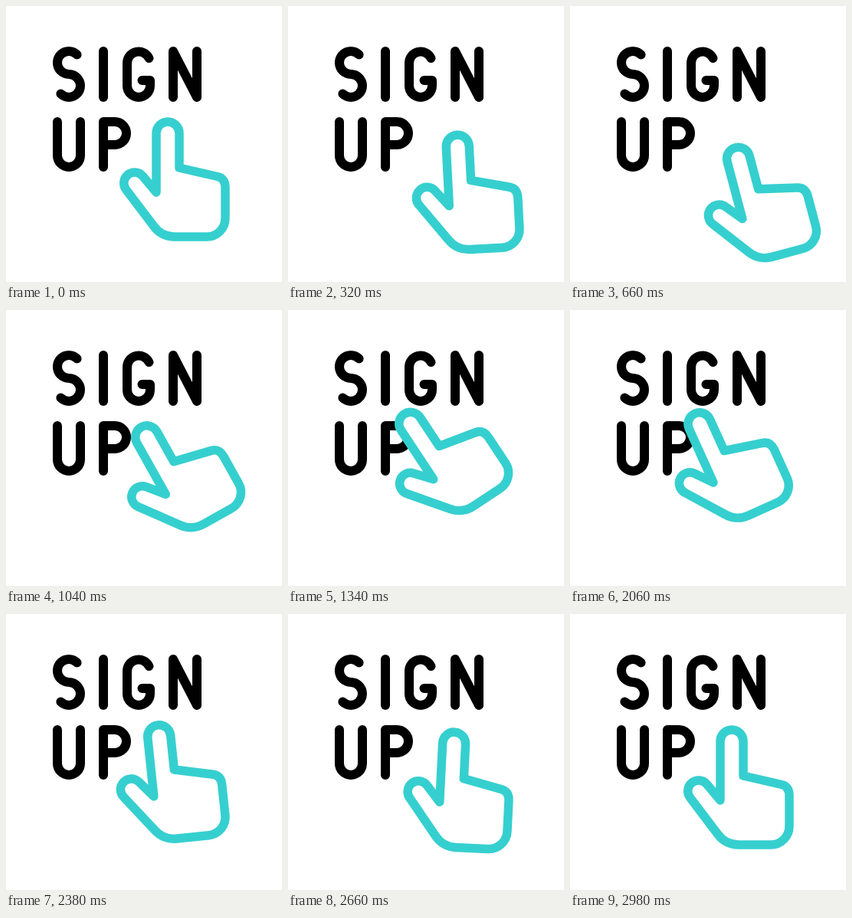
Recreate the animation shown at these times as an HTML page. Size 360x360 px, loop 3.6 s.

```html
<!DOCTYPE html>
<html lang="en">
<head>
<meta charset="utf-8">
<title>Sign up</title>
<style>
  html, body { margin: 0; width: 100%; height: 100%; overflow: hidden; background: #fff; }
  svg { display: block; width: 100%; height: 100%; }
  path { stroke-linecap: round; stroke-linejoin: round; }
</style>
</head>
<body>
<svg viewBox="0 0 360 360" role="img" aria-label="Sign up">
  <g id="label" fill="none" stroke="#000" stroke-width="12">
    <path d="M92.6 63.4A15 15 0 0 0 67 74A15 15 0 0 0 82 89A15 15 0 0 1 82 119A15 15 0 0 1 71.4 114.6"/>
    <path d="M127 59V119"/>
    <path d="M186.5 68A15 15 0 0 0 158 74V104A15 15 0 0 0 188 104V97H177.5"/>
    <path d="M218 119V59L249 119V59"/>
    <path d="M67 151V195A15 15 0 0 0 97 195V151"/>
    <path d="M127 210V151H142A15 15 0 0 1 142 181H127"/>
  </g>
  <path id="hand" fill="#fff" stroke="#36cfcf" stroke-width="11.5"/>
</svg>
<script>
const LOOP = 3600;
const TEAL = '#33cccc';
const PIVOT = { x: 220, y: 225 };
const label = document.getElementById('label');
const hand = document.getElementById('hand');

// Sine ease from 0 to 1 between two times
function ease(t, from, to) {
  const u = Math.min(1, Math.max(0, (t - from) / (to - from)));
  return (1 - Math.cos(Math.PI * u)) / 2;
}

// The index finger leans left by `bend` while pressing
function handPath(bend) {
  return `M196 243L${196 - bend} 166a15 15 0 0 1 30 0L226 211L276 222.5Q286 225 286 237
    V277A24 24 0 0 1 262 301H220A33 33 0 0 1 193 287.5L157 240A13.8 13.8 0 0 1 178.5 222Z`;
}

function draw(t) {
  const pull = ease(t, 0, 600);
  const back = ease(t, 1810, 2730);
  const settle = ease(t, 2720, 2980);
  const press = ease(t, 1500, 1600) - ease(t, 1720, 1820);

  // pull away, swing onto the label, return past rest, settle
  const x = PIVOT.x + 24 * pull - 47 * ease(t, 600, 1480) + 26 * back - 3 * settle;
  const y = PIVOT.y + 30 * pull - 62.5 * ease(t, 600, 1320) + 36.5 * back - 4 * settle;
  const angle = -33.5 * ease(t, 80, 1330) + 36.5 * ease(t, 1745, 2695) - 3 * settle;

  hand.setAttribute('d', handPath(5 * press));
  hand.setAttribute('transform',
    `translate(${x} ${y}) rotate(${angle}) translate(${-PIVOT.x} ${-PIVOT.y})`);
  label.setAttribute('transform', `translate(0 ${4 * press})`);
  label.setAttribute('stroke', t >= 1500 && t < 1800 ? TEAL : '#000');
}

const start = performance.now();
function tick() {
  draw((performance.now() - start) % LOOP);
  requestAnimationFrame(tick);
}
draw(0);
requestAnimationFrame(tick);
</script>
</body>
</html>
```
